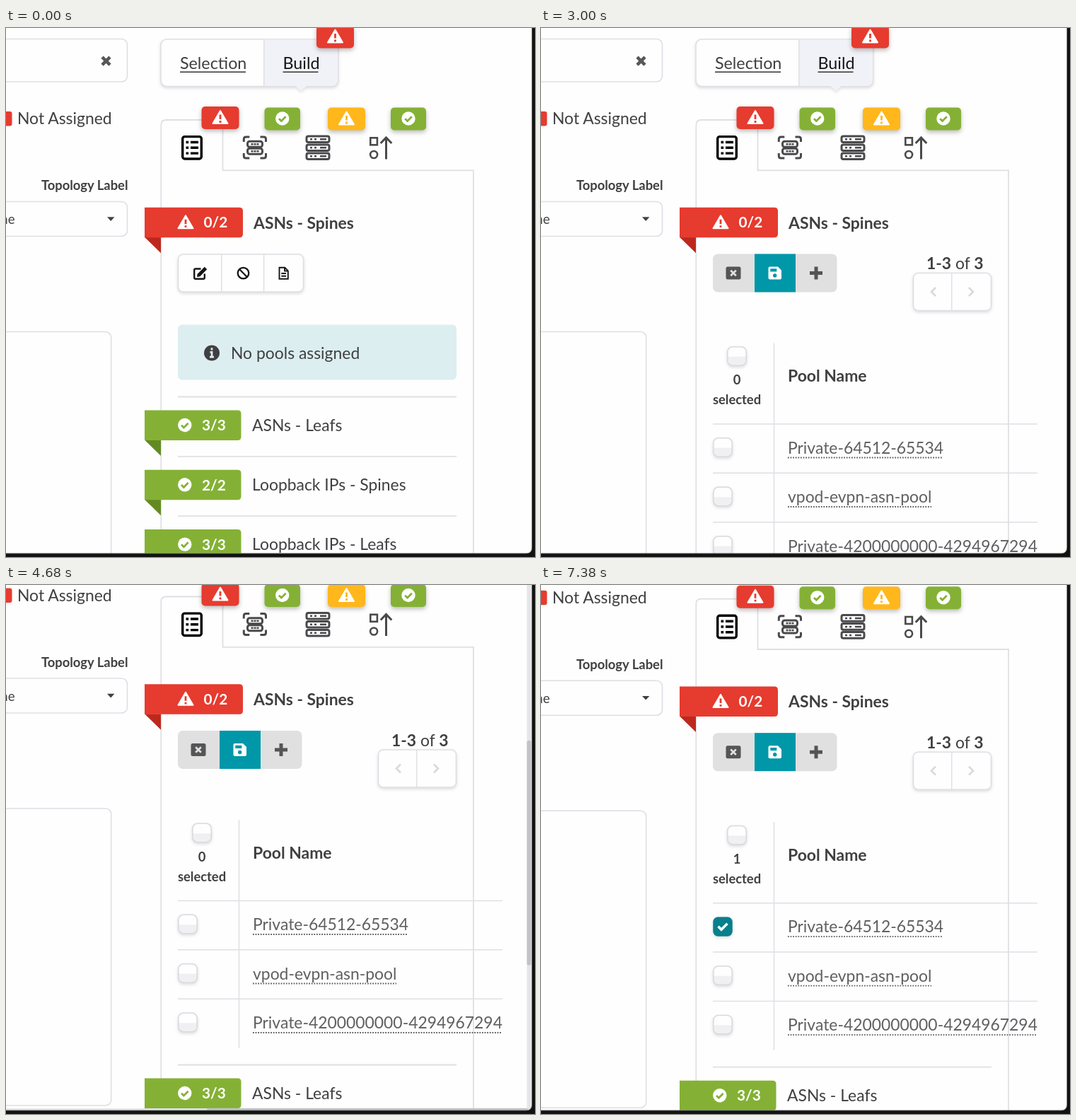
Recreate the animation shown at these times as an HTML page. Size 748 by 748 pixels, loop 8 s.

```html
<!DOCTYPE html>
<html lang="en">
<head>
<meta charset="utf-8">
<style>
  html, body { margin: 0; height: 100%; overflow: hidden; background: #fefefe; }
  svg { display: block; width: 748px; height: 748px; font: 22.9px Lato, sans-serif; fill: #404042; }
  .b { font-weight: 700; }
  .small { font-size: 18.4px; }
  .mode { font-size: 23.3px; }
  .line { fill: none; stroke: #dfe0e5; stroke-width: 1.8; }
  .thin { stroke-width: 1.5; }
  .box { fill: #fefefe; stroke: #dedfe5; stroke-width: 1.6; }
  .ink { fill: none; stroke: #4a4a4c; stroke-width: 3; }
  .raised { filter: drop-shadow(0 2px 2px #0002); }
  .badge { filter: drop-shadow(0 3px 3px #0004); }
  .white { fill: #fff; }
  .link { fill: #606062; }
</style>
</head>
<body>
<svg viewBox="0 0 748 748">
  <defs>
    <g id="warn">
      <path d="M0-9.5 10.5 8.5H-10.5Z" fill="#fff" stroke="#fff" stroke-width="2" stroke-linejoin="round"/>
      <path d="M0-4V2.5M0 4.6V7.4" stroke="currentColor" stroke-width="2.8"/>
    </g>
    <g id="ok">
      <circle r="9.7" fill="#fff"/>
      <path d="M-4.8.2-1.4 3.6 4.8-2.8" fill="none" stroke="currentColor" stroke-width="2.8"/>
    </g>
    <g id="check" class="raised">
      <rect x="-13.2" y="-13.2" width="26.4" height="26.4" rx="7" fill="url(#shade)" stroke="#d9dae0" stroke-width="1.6"/>
    </g>
    <linearGradient id="shade" x2="0" y2="1">
      <stop offset=".5" stop-color="#fefefe"/><stop offset=".55" stop-color="#f0f0f2"/>
    </linearGradient>
    <g id="server">
      <rect x="-16" y="-4.3" width="32" height="8.6" rx="2.5" class="ink"/>
      <path d="M-11 0h3M-5 0h3M3 0h9" stroke="#4a4a4c" stroke-width="2.5"/>
    </g>
    <g id="disk">
      <rect x="-10.5" y="-4" width="21" height="8" rx="3" class="ink"/>
      <path d="M-5.5 0h3M-1.5 0h3M2.5 0h3" stroke="#4a4a4c" stroke-width="2.4"/>
    </g>
  </defs>

  <g id="page">
    <!-- left column -->
    <rect class="box" x="-30" y="15.5" width="201.5" height="60.5" rx="8"/>
    <path d="M136 41.2 147 52.2M147 41.2 136 52.2" stroke="#58585a" stroke-width="4.6"/>
    <rect x="-12" y="118" width="20.5" height="20.5" rx="3" fill="#e63b2f"/>
    <text x="16" y="136.3">Not Assigned</text>
    <text class="b small" x="172.5" y="229" text-anchor="end">Topology Label</text>
    <rect class="box" x="-30" y="245.5" width="201.5" height="49" rx="8"/>
    <text x="12.5" y="277" text-anchor="end" style="font-size:18.6px">one</text>
    <path d="M143 267.3h10.4l-5.2 5.6Z"/>
    <rect class="box" x="-30" y="429.5" width="178.7" height="420" rx="8"/>

    <!-- mode switch -->
    <g class="raised">
      <rect class="box" x="219" y="16" width="250.5" height="66.5" rx="8"/>
      <path d="M365 16.8h96.5a7 7 0 0 1 7 7v51a7 7 0 0 1-7 7H425l-8 7.5-8-7.5H365Z" fill="#f1f2f8"/>
    </g>
    <path class="line thin" d="M364.7 16V82.5"/>
    <text class="mode" x="246" y="57.8">Selection</text>
    <text class="mode" x="391.5" y="57.8" style="fill:#151517">Build</text>
    <path d="M246 62.3H339M391.5 62.3H441.5" stroke="#333" stroke-width="1.4"/>

    <!-- tabs -->
    <path class="line" d="M219.3 1200V137q0-7 7-7H306.5V201.3H661V1200"/>
    <g fill="none" stroke="#000" stroke-width="3.4">
      <rect x="249.7" y="153.6" width="26.6" height="31.4" rx="3"/>
      <path d="M254.5 161.5h3.6M254.5 169.3h3.6M254.5 177.1h3.6M261 161.5h11M261 169.3h11M261 177.1h11"/>
    </g>
    <path class="ink" d="M336.3 161v-4q0-3 3-3h5M359.5 154h5q3 0 3 3v4M367.5 177v4q0 3-3 3h-5M344.3 184h-5q-3 0-3-3v-4"/>
    <use href="#disk" x="352" y="164.3"/><use href="#disk" x="352" y="174.3"/>
    <use href="#server" x="441" y="157.2"/><use href="#server" x="441" y="169.2"/><use href="#server" x="441" y="181.2"/>
    <g class="ink">
      <rect x="515.3" y="155.3" width="9.6" height="10" stroke-width="2.6"/>
      <circle cx="520.1" cy="179" r="5" stroke-width="2.6"/>
      <path d="M537.5 185.5V155.5M529.7 163 537.5 155 545.3 163"/>
    </g>
    <g id="badges"></g>

    <!-- red section -->
    <g id="spines"></g>
    <text class="b" x="350" y="283.6">ASNs - Spines</text>

    <g id="view">
      <g class="raised"><rect class="box" x="243.5" y="320" width="177" height="53" rx="7"/></g>
      <path class="line thin" d="M304.7 320V373M364.6 320V373"/>
      <circle id="press" cx="275" cy="347"/>
      <g fill="none" stroke="#151517">
        <path d="M275.5 340.5H268q-1.8 0-1.8 1.8V353q0 1.8 1.8 1.8h11q1.8 0 1.8-1.8v-5.5" stroke-width="2.4"/>
        <path d="M272.5 349.5 282.5 339.5" stroke-width="5"/>
        <path d="M270.5 351.5l.8-4 3.2 3.2Z" fill="#151517" stroke-width="1"/>
        <circle cx="335.5" cy="346.6" r="7.8" stroke-width="2.3"/>
        <path d="M330 341 341 352.2" stroke-width="2.3"/>
        <path d="M386.5 338.8h7.8l4.5 4.5v11.5H386.5ZM394 339v4.6h4.6M389.3 347h6.8M389.3 350.8h6.8" stroke-width="1.9"/>
      </g>
      <rect x="243" y="419.5" width="394" height="78" rx="6" fill="#dceef0"/>
      <circle cx="291" cy="459.5" r="11"/>
      <path d="M291 452.2V455.5M288.5 458.3h2.6V465M288 465.2h6" fill="none" stroke="#dceef0" stroke-width="2.7"/>
      <text x="318" y="468">No pools assigned</text>
    </g>

    <g id="edit">
      <rect x="243" y="319.5" width="175.5" height="54" rx="7" fill="#e0e0e1"/>
      <rect x="302" y="319.5" width="58" height="54" fill="#0097a8"/>
      <rect x="261.5" y="337.5" width="21" height="18" rx="2.5" fill="#555557"/>
      <path d="M268.2 342.7l7.6 7.6M275.8 342.7l-7.6 7.6" stroke="#e0e0e1" stroke-width="2.7"/>
      <path class="white" d="M323.5 337.5h11.5l5 5V353.5q0 2-2 2H323.5q-2 0-2-2v-14q0-2 2-2Z"/>
      <path d="M324.3 340.3h9v4.2h-9Z" fill="#0097a8"/><circle cx="330.7" cy="350" r="2.7" fill="#0097a8"/>
      <path d="M389 337.5V355.5M380 346.5H398" stroke="#555557" stroke-width="5"/>
      <text x="545" y="341"><tspan class="b">1-3</tspan> of <tspan class="b">3</tspan></text>
      <g class="raised"><rect class="box" x="526.5" y="346.5" width="110" height="53" rx="7"/></g>
      <path class="line thin" d="M580.7 346.5V399.5"/>
      <path d="M558 367l-6 6 6 6M605 367l6 6-6 6" fill="none" stroke="#d8d9dc" stroke-width="2.6"/>
      <use href="#check" x="277" y="464"/>
      <g class="b small" text-anchor="middle">
        <text id="count" x="277" y="504">0</text><text x="277" y="532">selected</text>
      </g>
      <text class="b" x="349" y="500.3">Pool Name</text>
      <path class="line thin" d="M329.5 445.5V768M243 560H702M243 629.3H702M243 698.7H702"/>
      <g id="rows"></g>
      <g id="checked">
        <rect x="243.3" y="579.7" width="27.4" height="27.4" rx="7" fill="#087f8c"/>
        <path d="M250.5 593l4.5 4.5 8.5-8.5" fill="none" stroke="#fff" stroke-width="3.6"/>
      </g>
      <circle id="tick" cx="256.5" cy="593.5"/>
    </g>

    <g id="list"></g>

    <g id="tip">
      <path d="M159 389H265.5L276.3 378 287 389H392q8 0 8 8V451.5q0 8-8 8H159q-8 0-8-8V397q0-8 8-8Z" fill="#000"/>
      <text class="white" x="174.5" y="433">Update assignments</text>
    </g>
  </g>

  <g id="bars" fill="#c3c3c5">
    <path d="M736.5 0h7v743h-7ZM0 740h737v3H0Z" fill="#e6e6e8"/>
    <rect id="thumb" x="736.5" width="6" height="318" rx="3"/>
    <rect x="284" y="739.8" width="454" height="4" rx="2"/>
  </g>
  <path d="M-9-9H757V757H-9ZM-5-5V742.8H735.5q8 0 8-8V-5Z" fill="#121213" fill-rule="evenodd" stroke="#9a9a9c" stroke-width=".8"/>
</svg>
<script>
const $ = id => document.getElementById(id);
const RED = '#e63b2f', GREEN = '#84b135', YELLOW = '#ffb71b';

const badge = (x, y, w, color, icon) => `<g color="${color}">
  <rect class="badge" x="${x}" y="${y}" width="${w}" height="32" rx="5" fill="${color}"/>
  <use href="#${icon}" x="${x + w / 2}" y="${y + 15.5}"/></g>`;

const ribbon = (y, right, color, fold, icon, label) => `<g color="${color}">
  <path d="M196 ${y + 42}h23v22.5Z" fill="${fold}"/>
  <path d="M196 ${y}H${right - 5}q5 0 5 5v32.5q0 5-5 5H196Z" fill="${color}"/>
  <use href="#${icon}" x="${icon == 'ok' ? 252.8 : 254}" y="${y + 21}"/>
  <text class="b white" x="${right - 55.5}" y="${y + 28.7}" style="font-size:20.8px">${label}</text></g>`;

$('badges').innerHTML = badge(439, -3.5, 53, RED, 'warn') + badge(276.5, 111, 53, RED, 'warn') +
  badge(365.5, 112.5, 50.5, GREEN, 'ok') + badge(455, 112.5, 53, YELLOW, 'warn') + badge(544, 112.5, 50, GREEN, 'ok');
$('spines').innerHTML = ribbon(253.7, 335, RED, '#bd281e', 'warn', '0/2');

$('list').innerHTML = [['3/3', 'ASNs - Leafs'], ['2/2', 'Loopback IPs - Spines'], ['3/3', 'Loopback IPs - Leafs']]
  .map(([label, name], i) => {
    const y = 540.5 + i * 84.3;
    return `<path class="line" d="M243 ${y - 19}H637"/>` + ribbon(y, 332.5, GREEN, '#638a22', 'ok', label) +
      `<text x="348" y="${y + 29.3}">${name}</text>`;
  }).join('');

$('rows').innerHTML = [['Private-64512-65534', 568], ['vpod-evpn-asn-pool', 552], ['Private-4200000000-4294967294', 701]]
  .map(([name, end], i) => {
    const y = 593 + i * 69.5;
    return `<use href="#check" x="257" y="${y}"/><text class="link" x="349" y="${y + 8.7}">${name}</text>
      <path d="M349 ${y + 14.5}H${end}" stroke="#606062" stroke-width="1.8" stroke-dasharray="1.8"/>`;
  }).join('');

const ramp = (t, from, to) => Math.min(1, Math.max(0, (t - from) / (to - from)));
const show = (id, on) => $(id).setAttribute('display', on ? 'inline' : 'none');

// time, offset, speed (px per ms)
const scrollKeys = [[3680, 0, .06], [3840, 23.7, .19], [4200, 86.5, .13], [4500, 111.5, .02],
  [4680, 113.5, 0], [4840, 113.5, 0], [5340, 110.3, 0]];

function scrollAt(t) {
  if (t <= scrollKeys[0][0]) return 0;
  const i = scrollKeys.findIndex(k => k[0] > t);
  if (i < 0) return scrollKeys.at(-1)[1];
  const [t0, a, va] = scrollKeys[i - 1], [t1, b, vb] = scrollKeys[i];
  const d = t1 - t0, u = (t - t0) / d, v = 1 - u;
  return v * v * ((1 + 2 * u) * a + u * d * va) + u * u * ((3 - 2 * u) * b - v * d * vb);
}

function pulse(id, t, start) {
  const u = ramp(t, start, start + 420);
  const c = $(id);
  c.setAttribute('r', 11 + 5 * u);
  c.setAttribute('fill', '#8fc1f5');
  c.setAttribute('opacity', t < start ? 0 : .55 * (1 - u));
}

function draw() {
  const t = performance.now() % 8000;
  const editing = t >= 2340, picked = t >= 6300, scroll = scrollAt(t);
  show('view', !editing);
  show('edit', editing);
  show('checked', picked);
  $('count').textContent = picked ? 1 : 0;
  $('list').setAttribute('transform', `translate(0 ${editing ? 270.5 : 0})`);
  $('page').setAttribute('transform', `translate(0 ${-scroll})`);
  $('tip').setAttribute('opacity', ramp(t, 1060, 1260) * (1 - ramp(t, 2280, 2460)));
  $('bars').setAttribute('opacity', t < 3690
    ? ramp(t, 2340, 2400) * (1 - ramp(t, 2740, 3000))
    : 1 - ramp(t, 6860, 7080));
  $('thumb').setAttribute('y', 218 + scroll * .015);
  pulse('press', t, 2100);
  pulse('tick', t, 6060);
  requestAnimationFrame(draw);
}
draw();
</script>
</body>
</html>
```
